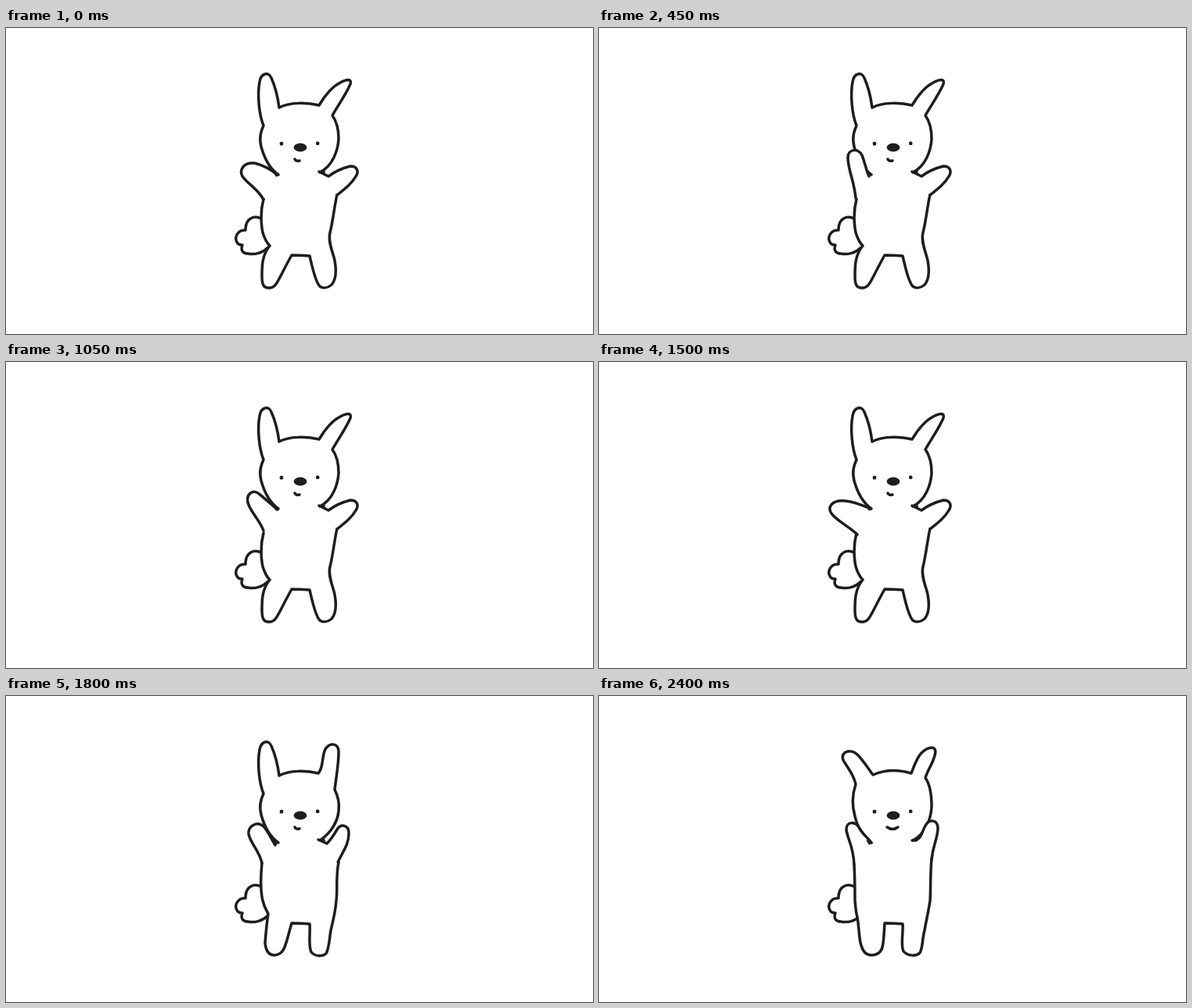
An HTML page for the animation above (2550 ms loop, 750x392 px).

```html
<!DOCTYPE html>
<html lang="en">
<head>
<meta charset="utf-8">
<title>Waving bunny</title>
<style>
  html, body { margin: 0; width: 100%; height: 100%; overflow: hidden; background: #fff; }
  svg { display: block; width: 100%; height: 100%; }
  .line { fill: #fff; stroke: #1e1e1e; stroke-width: 3.5; stroke-linecap: round; stroke-linejoin: round; }
  .open { fill: none; }
  .ink { fill: #1e1e1e; }
</style>
</head>
<body>
<svg viewBox="0 0 750 392">
  <path class="line" d="M326 244C317 240 306 243 306 259C297 258 290 268 296 276C298 278 300 278 302 278C299 286 304 289 309 289C318 291 328 288 335 281"/>
  <path class="line" id="body"/>
  <path class="line open" id="head"/>
  <path class="line" id="leftArm"/>
  <path class="line" id="rightArm"/>
  <path class="ink" d="M341 184L349 187L345 191Z"/>
  <path class="ink" id="rightNook"/>
  <rect class="ink" x="349.8" y="145.8" width="4.4" height="4.6" rx="1.5"/>
  <rect class="ink" x="396" y="145.5" width="4.4" height="4.6" rx="1.5"/>
  <ellipse class="ink" cx="376" cy="153" rx="8.4" ry="5.4"/>
  <path class="line open" id="mouth"/>
</svg>
<script>
const STEP = 150;

// Every pose of a part shares one path structure, so any two can be blended.
const leftEarUp = 'M348 188C334 178 329 163 326 152C323 140 326 132 329 125C323 110 321 85 324 69C326 57 336 56 339 64C343 73 347 86 349 102';
const smirk = 'M369 168Q370 171 375 170';
const nook = 'M399 185L407 181L408 187Z';

const open = {
  head: leftEarUp + 'C362 95 384 95 400 99C406 89 415 76 427 70C438 64 443 66 439 74C433 87 425 98 417 112C424 122 425 135 425 142C424 158 417 177 401 185',
  body: 'M329 219C325 235 326 252 328 262C331 272 334 276 337 279C327 291 327 305 327 318C327 330 330 333 336 333C346 333 346 325 365 291Q377 291 388 292C391 305 395 325 401 331C405 334 411 333 416 329C422 322 422 309 420 298C418 288 411 274 414 262C418 246 419 232 423 213',
  rightArm: 'M400 184L412 190C420 184 432 179 440 177C449 177 451 184 447 190C442 199 433 206 423 214',
  rightNook: nook,
  mouth: smirk
};

const half = {
  head: leftEarUp + 'C362 95 384 95 399 99C406 92 403 78 408 68C414 59 425 60 425 72C425 88 422 102 420 120C425 130 426 140 425 147C424 160 416 175 401 185',
  body: 'M327 214C325 235 325 250 328 262C330 271 333 275 335 279C333 291 332 305 331 316C332 328 337 332 343 332C357 331 357 318 365 291Q377 291 388 292C389 305 386 320 390 328C395 334 404 334 409 330C413 323 413 312 415 300C418 288 421 276 422 262C424 246 421 232 425 213',
  leftArm: 'M344 191C337 180 334 172 329 167C321 160 309 166 310 177C313 190 323 197 327 214',
  rightArm: 'M399 184L410 189C416 183 420 176 423 171C428 163 438 165 438 176C438 190 431 198 424 213',
  rightNook: nook,
  mouth: smirk
};

const tall = {
  head: 'M348 187C334 172 328 165 327 158C324 145 323 130 324 112C324 97 327 86 331 76C335 64 347 60 348 74C348 82 348 90 349 102C366 94 382 94 398 100C399 90 398 80 400 72C402 63 411 61 414 72C416 88 420 100 422 118C424 135 425 145 424 156C420 168 414 176 400 185',
  body: 'M326 216C327 235 327 250 327 262C328 271 328 277 330 283C332 295 332 305 334 316C337 328 341 332 349 332C365 331 363 318 365 291Q377 291 388 292C389 305 385 318 389 327C394 333 405 334 410 329C414 322 413 310 416 300C418 288 421 276 423 262C424 246 423 230 425 208',
  leftArm: 'M346 189C345 180 345 170 343 164C339 155 327 154 325 165C324 183 322 200 326 217',
  rightArm: 'M398 184L407 188C407 180 407 170 409 164C412 155 422 155 424 165C425 177 431 190 425 210',
  rightNook: nook,
  mouth: smirk
};

const smile = {
  head: 'M348 188C336 176 330 168 327 154C323 140 324 125 328 113C325 99 316 90 312 82C308 71 322 67 330 75C339 84 343 92 350 101C366 94 382 94 399 99C403 88 407 78 412 73C421 64 433 63 429 76C426 88 420 94 417 105C425 116 425 135 425 142C424 158 417 177 401 185',
  body: tall.body,
  leftArm: 'M348 188C343 181 336 176 333 170C328 160 316 160 316 171C317 182 325 192 326 216',
  rightArm: 'M400 185L405 185C412 182 413 173 417 166C422 157 433 158 433 170C432 185 427 190 425 209',
  rightNook: 'M399 185L405 184L405 186Z',
  mouth: 'M368 168Q375 173 382 168'
};

const wide = 'M347 188C338 184 326 179 315 178C296 176 292 187 297 194C303 203 320 211 330 221';
const low = 'M347 188C338 181 327 175 317 173C303 172 298 182 302 190C310 201 322 206 329 220';
const raised = 'M347 189C338 182 330 174 322 168C314 163 307 170 309 180C312 192 324 202 329 216';
const high = 'M345 190C341 181 339 170 336 163C331 153 318 155 318 166C318 182 326 195 328 218';

function blend(a, b, t = 0.5) {
  const goal = b.match(/[\d.]+/g);
  let i = 0;
  return a.replace(/[\d.]+/g, n => +n + (goal[i++] - n) * t);
}

function blendPose(a, b) {
  return Object.fromEntries(Object.keys(a).map(part => [part, blend(a[part], b[part])]));
}

const withArm = leftArm => ({ ...open, leftArm });
const upper = blend(raised, high);
const wave = [low, raised, upper, high, blend(high, tall.leftArm, 0.6),
  high, upper, raised, low, blend(low, wide), wide].map(withArm);
const stretch = blendPose(half, tall);
const poses = [...wave, blendPose(withArm(wide), half), half, stretch, tall, stretch, smile];

function draw() {
  const pose = poses[Math.floor(performance.now() / STEP) % poses.length];
  for (const part in pose) document.getElementById(part).setAttribute('d', pose[part]);
  requestAnimationFrame(draw);
}
draw();
</script>
</body>
</html>
```
